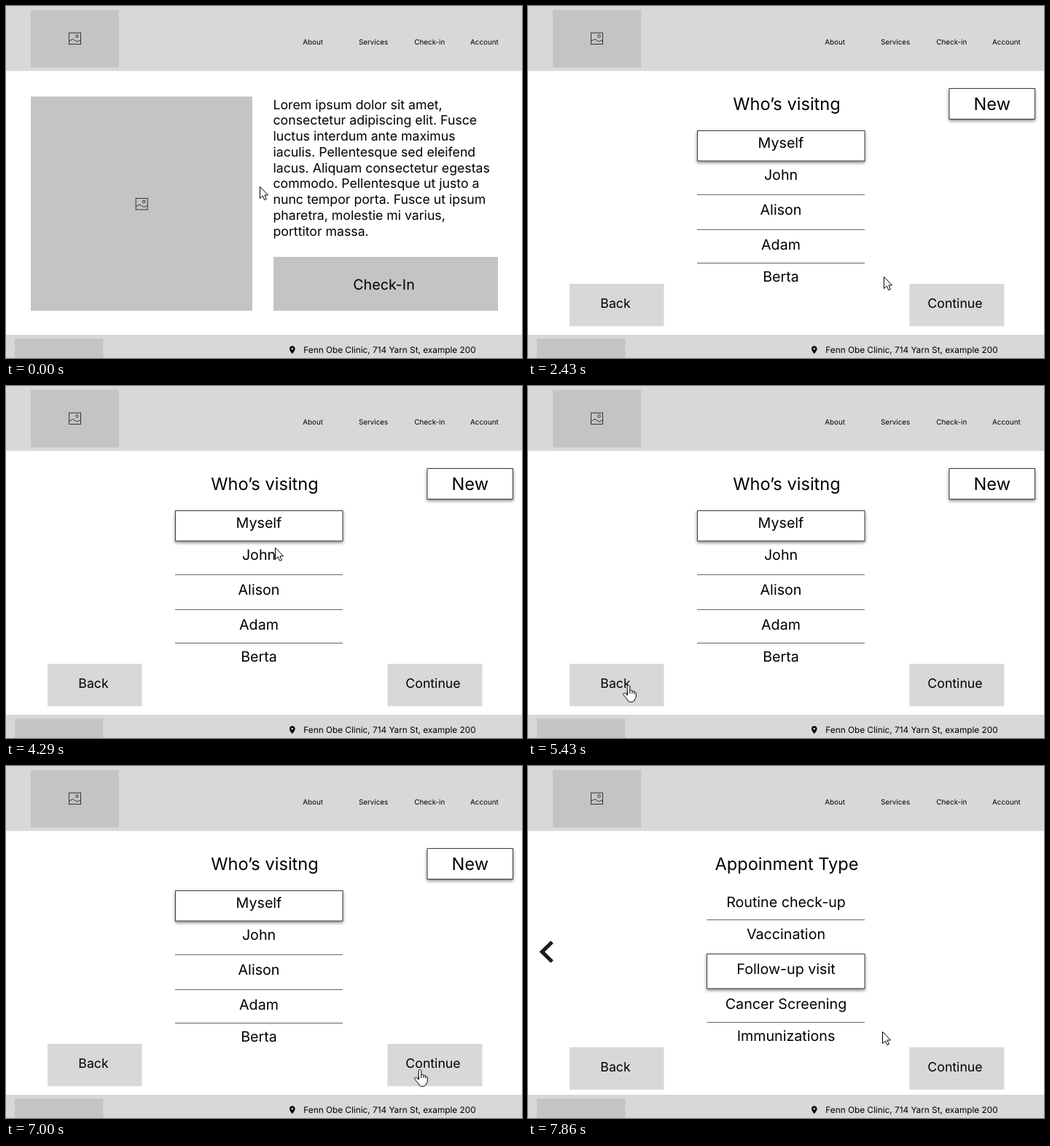
Animation of 708 by 484 pixels, one loop 8000 ms. Source, as an HTML page:

```html
<!DOCTYPE html>
<html lang="en">
<head>
<meta charset="utf-8">
<title>Clinic check-in wireframe</title>
<style>
  /* Type sizes of a 1440 px layout, shown 708 px wide */
  :root { --k: calc(708px / 1440); }
  html, body { margin: 0; width: 100%; height: 100%; overflow: hidden; background: #fff; }
  svg { display: block; width: 708px; height: 484px; }
  text { font-family: Inter, "Open Sans", sans-serif; font-optical-sizing: none; text-rendering: geometricPrecision; fill: #000; }
  .bar { fill: #d8d8d8; }
  .block { fill: #c4c4c4; }
  .rule { stroke: #666; fill: none; }
  .card { fill: #fff; stroke: #3c3c3c; filter: url(#shadow); }
  .icon { fill: none; stroke: #333; }
  .cursor { fill: #fff; stroke: #000; stroke-linejoin: round; }
  .mid { text-anchor: middle; }
  .tiny { font-size: calc(20 * var(--k)); }
  .small { font-size: calc(24 * var(--k)); }
  .body { font-size: calc(36 * var(--k)); }
  .item { font-size: calc(40 * var(--k)); }
  .head { font-size: calc(48 * var(--k)); }
</style>
</head>
<body>
<svg viewBox="0 0 708 484">
  <defs>
    <filter id="shadow" x="-10%" y="-30%" width="120%" height="170%">
      <feDropShadow dx="0" dy="2" stdDeviation="2" flood-color="#000" flood-opacity=".5"/>
    </filter>
    <g id="image" class="icon">
      <rect x=".5" y=".5" width="16" height="15.5"/>
      <circle cx="11.5" cy="5" r="1.8"/>
      <path d="M.5 12L5.5 9L11.5 12.500L16.500 10.500"/>
    </g>
  </defs>

  <rect class="bar" width="708" height="89.3"/>
  <rect class="block" x="34" y="5.5" width="121" height="79"/>
  <use href="#image" x="86" y="36.5"/>
  <g class="tiny">
    <text x="407.3" y="53">About</text>
    <text x="483.9" y="53">Services</text>
    <text x="560.3" y="53">Check-in</text>
    <text x="637" y="53">Account</text>
  </g>

  <g id="home">
    <rect class="block" x="34" y="124.5" width="304" height="294.5"/>
    <use href="#image" x="177.7" y="264"/>
    <g id="copy" class="body"></g>
    <rect class="block" x="367" y="345" width="308" height="74"/>
    <text class="item mid" x="518.5" y="390">Check-In</text>
  </g>

  <g id="people">
    <text class="head mid" x="355" y="143.3">Who’s visitng</text>
    <rect class="card" x="578" y="113.5" width="117.5" height="42"/>
    <text class="head mid" x="636.8" y="143.3">New</text>
    <rect class="card" x="232.5" y="171.5" width="229.5" height="41.5"/>
    <path class="rule" d="M232 259.5H462M232 307.5H462M232 353.5H462"/>
    <g class="item mid">
      <text x="347" y="195">Myself</text>
      <text x="347" y="239">John</text>
      <text x="347" y="287">Alison</text>
      <text x="347" y="335">Adam</text>
      <text x="347" y="379">Berta</text>
    </g>
  </g>

  <g id="types">
    <text class="head mid" x="355" y="143.3">Appoinment Type</text>
    <path d="M33 242L19.3 255.5L33 269" fill="none" stroke="#1d1b20" stroke-width="5.2"/>
    <path class="rule" d="M245.5 211.5H462M245.5 352.5H462"/>
    <rect class="card" x="245.5" y="258.5" width="216.5" height="47.5"/>
    <g class="item mid">
      <text x="354" y="193.7">Routine check-up</text>
      <text x="354" y="237.7">Vaccination</text>
      <text x="354" y="285.7">Follow-up visit</text>
      <text x="354" y="333.7">Cancer Screening</text>
      <text x="354" y="377.7">Immunizations</text>
    </g>
  </g>

  <g id="nav">
    <rect class="bar" x="57" y="382" width="129.5" height="58.3"/>
    <rect class="bar" x="523.5" y="382" width="130" height="58.3"/>
    <text class="body mid" x="120" y="415">Back</text>
    <text class="body mid" x="586" y="415">Continue</text>
  </g>

  <rect class="bar" y="452" width="708" height="32"/>
  <rect class="block" x="12.3" y="457.3" width="121" height="27"/>
  <path fill-rule="evenodd" d="M392.8 467.5C390.7 467.5 389 469.2 389 471.3C389 474 392.8 478.3 392.8 478.3S396.6 474 396.6 471.3C396.6 469.2 394.9 467.5 392.8 467.5ZM392.8 470A1.35 1.35 0 1 1 392.8 472.7A1.35 1.35 0 1 1 392.8 470Z"/>
  <text class="small" x="408.3" y="477">Fenn Obe Clinic, 714 Yarn St, example 200</text>

  <path id="arrow" class="cursor" d="M.5 .5V16.6L4.3 13L6.8 18.6L9.3 17.5L6.9 12H11.5Z"/>
  <g id="hand" class="cursor">
    <path d="M-.8 2.2C-.8 0 2.8 0 2.8 2.2V8C3.5 6.8 6 7.2 6 8.8C7 7.8 8.8 8.4 8.8 9.8C9.8 9 11.2 9.8 11.2 11.2V16C11.2 18 9.5 19.5 9.3 21C8.9 22.8 6 23.4 4 23.4S.2 22.8 -.3 21C-1.2 18.5 -4.3 16.5 -6 13.6C-7 11.6 -5 10.4 -3.4 11.8L-.8 14.2Z"/>
    <path fill="none" d="M-.8 9V14M2.8 8V12M6 8.8V12M8.8 9.8V12.5"/>
  </g>
</svg>
<script>
  const LOOP = 8000, FPS = 7;
  const $ = id => document.getElementById(id);

  const copy = [
    'Lorem ipsum dolor sit amet,',
    'consectetur adipiscing elit. Fusce',
    'luctus interdum ante maximus',
    'iaculis. Pellentesque sed eleifend',
    'lacus. Aliquam consectetur egestas',
    'commodo. Pellentesque ut justo a',
    'nunc tempor porta. Fusce ut ipsum',
    'pharetra, molestie mi varius,',
    'porttitor massa.'
  ];
  copy.forEach((line, i) => {
    const el = document.createElementNS('http://www.w3.org/2000/svg', 'text');
    el.setAttribute('x', 366.5);
    el.setAttribute('y', 141.7 + i * 21.75);
    el.textContent = line;
    $('copy').append(el);
  });

  // Pointer moves: first step, last step, end point, optional bend point
  const start = [348, 248];
  const moves = [
    { a: 0, b: 8, to: [487, 372], via: [311, 340] },
    { a: 8, b: 9, to: [488, 372] },
    { a: 20, b: 21, to: [487, 372] },
    { a: 22, b: 27, to: [370, 193], via: [400, 300] },
    { a: 28, b: 36, to: [136, 412], via: [388, 283] },
    { a: 37, b: 38, to: [137, 411] },
    { a: 38, b: 44, to: [567, 417], via: [350, 394] },
    { a: 51, b: 52, to: [565, 416] },
    { a: 53, b: 55, to: [486, 365] }
  ];

  const ease = u => u * u * (3 - 2 * u);

  function pointer(step) {
    let p = start;
    for (const { a, b, to, via } of moves) {
      if (step <= a) break;
      const u = ease(Math.min(1, (step - a) / (b - a)));
      const from = p;
      p = to.map((end, i) => {
        const mid = via ? via[i] : (from[i] + end) / 2;
        return from[i] * (1 - u) ** 2 + 2 * mid * u * (1 - u) + end * u * u;
      });
    }
    return p;
  }

  const inside = ([x, y], [l, t, r, b]) => x >= l && x <= r && y >= t && y <= b;
  const show = (id, on) => { $(id).style.display = on ? '' : 'none'; };

  function draw(time) {
    const step = Math.floor((time % LOOP + 5) * FPS / 1000) % 56;
    const scene = step < 17 ? 'home' : step < 50 ? 'people' : 'types';
    const drop = scene === 'types' ? 4.7 : 0;
    for (const id of ['home', 'people', 'types']) show(id, id === scene);
    show('nav', scene !== 'home');
    $('nav').setAttribute('transform', `translate(0 ${drop})`);

    const buttons = scene === 'home'
      ? [[367, 345, 675, 419]]
      : [[57, 382 + drop, 186, 440 + drop], [523, 382 + drop, 653, 440 + drop]];
    const p = pointer(step);
    const over = buttons.some(box => inside(p, box));
    show('hand', over);
    show('arrow', !over);
    $(over ? 'hand' : 'arrow').setAttribute('transform', `translate(${p.map(Math.round)})`);
  }

  const begin = performance.now();
  function tick() {
    draw(performance.now() - begin);
    requestAnimationFrame(tick);
  }
  tick();
</script>
</body>
</html>
```
